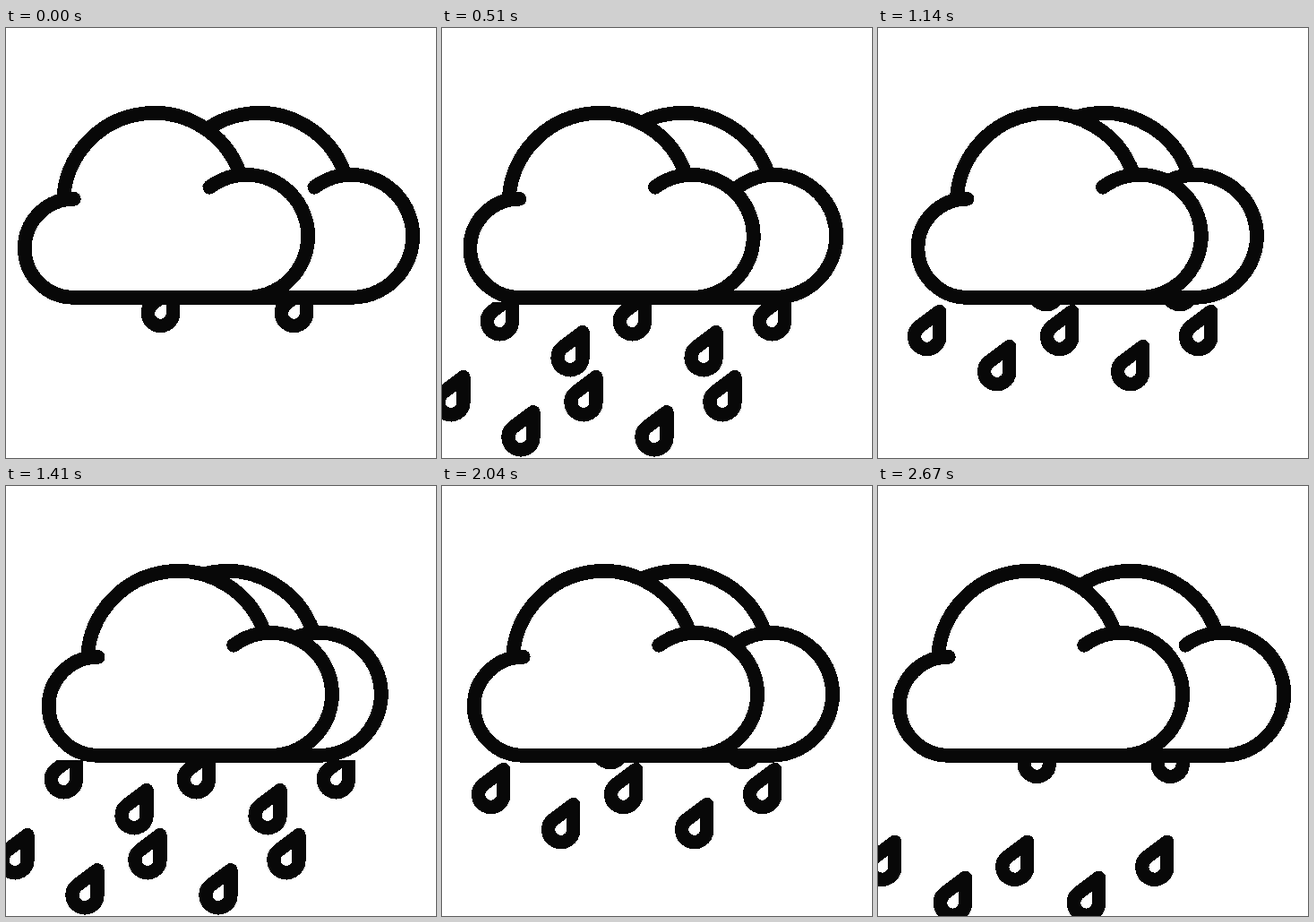
Animation, 480 px wide and 480 px high, one loop 2700 ms. Source, as an HTML page:

```html
<!DOCTYPE html>
<html>
<head>
<meta charset="utf-8">
<title>Rain clouds</title>
<style>
  html, body { margin: 0; height: 100%; overflow: hidden; background: #fff; }
  svg { display: block; width: 100%; height: 100%; }
</style>
</head>
<body>
<svg viewBox="0 0 480 480" fill="#fff" stroke="#080808" stroke-width="15.8" stroke-linecap="round" stroke-linejoin="round" shape-rendering="crispEdges">
  <defs>
    <path id="cloud" d="M227.3 177.7A68.5 68.5 0 1 1 269 300.8H75.8A55 55 0 0 1 75.8 190.8L64.2 189.8A101.5 101.5 0 0 1 261 162"/>
    <path id="drop" stroke-width="15.4" d="M14 0V-28L-8.4 -11.2A14 14 0 1 0 14 0Z"/>
    <clipPath id="sky"><rect y="306" width="480" height="174"/></clipPath>
  </defs>
  <g clip-path="url(#sky)"><g id="rain"></g></g>
  <use id="back" href="#cloud"/>
  <use id="front" href="#cloud"/>
</svg>
<script>
  const LOOP = 2700, HALF = LOOP / 2, RAIN = 900, STEP = 30;
  const [rain, back, front] = ['rain', 'back', 'front'].map(id => document.getElementById(id));

  // Each row: y, then the x of its drops at the start of a rain cycle.
  const rows = [
    [74.5, 321.3, 470.3],
    [189.4, 148.8, 296.8, 452.8],
    [229.4, 227.5, 376.5],
    [279.4, 94.4, 242.4, 397.4],
    [318.5, 172.4, 321.4]
  ];
  rain.innerHTML = rows.map(([y, ...xs]) =>
    xs.map(x => `<use href="#drop" x="${x}" y="${y}"/>`).join('')).join('');

  const move = (el, x, y = 0) => el.setAttribute('transform', `translate(${x} ${y})`);

  function draw(now) {
    const t = Math.floor(now % LOOP / STEP) * STEP;
    const swing = 1 - Math.abs(t / HALF - 1);
    const fall = t % RAIN / RAIN;
    // The front cloud drifts back a little less far than it came.
    move(front, t < HALF ? 28 * swing : 2.4 + 25.6 * swing);
    move(back, 117 - 37 * swing);
    move(rain, -149 * fall, 244 * fall);
    requestAnimationFrame(() => draw(performance.now() - start));
  }
  const start = performance.now();
  draw(0);
</script>
</body>
</html>
```
